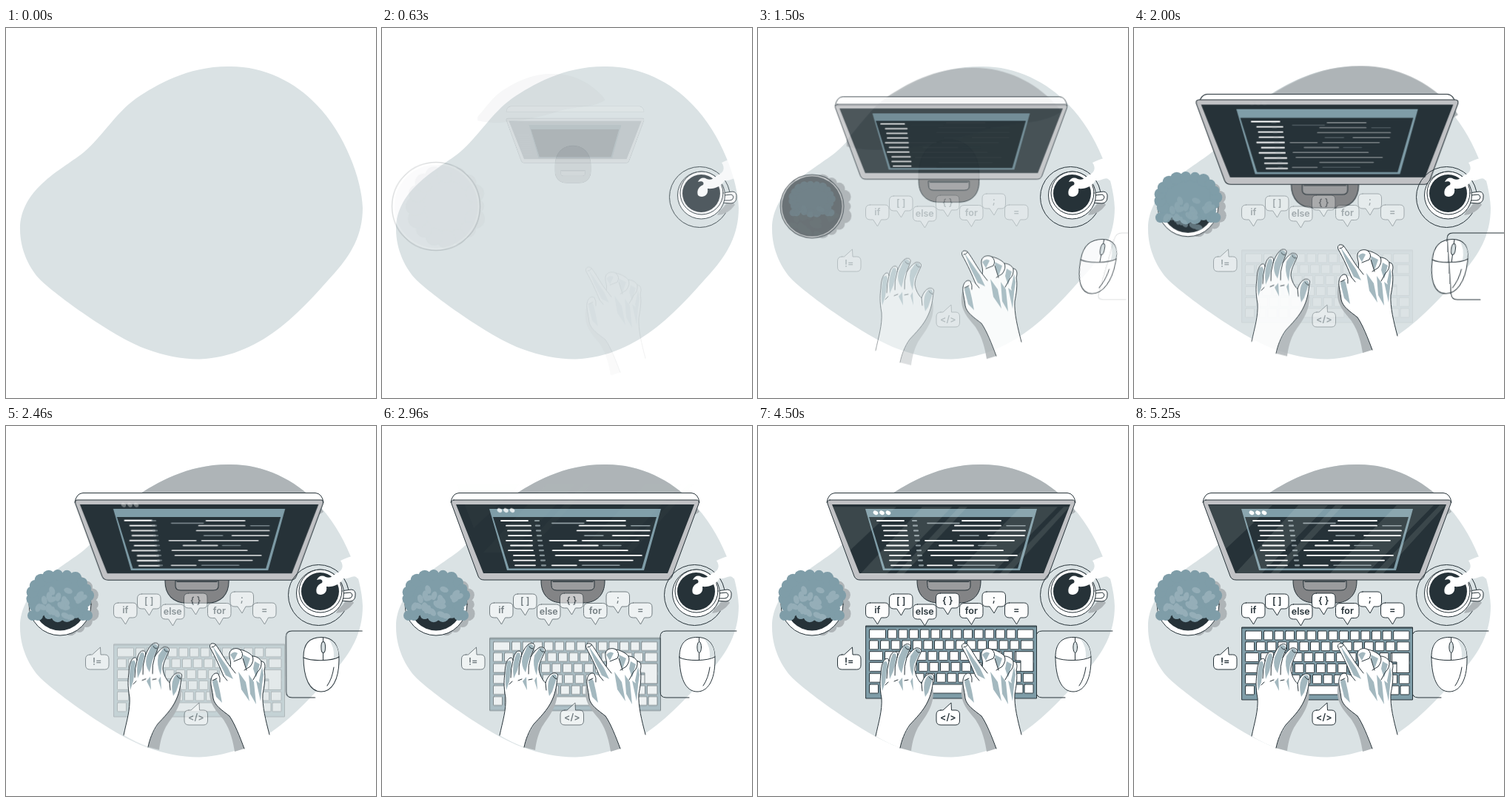
An HTML page for the animation above (5.54 s loop, 500 px wide and 500 px high).

```html
<!DOCTYPE html>
<html lang="en">
<head>
<meta charset="utf-8">
<title>Desk</title>
<style>
  html, body { margin: 0; width: 100%; height: 100%; overflow: hidden; background: #fff; }
  svg { display: block; width: 100vw; height: 100vh; }
  .o { stroke: #263238; stroke-width: 1; stroke-linejoin: round; stroke-linecap: round; }
  .w { fill: #fff; }
  .n { fill: none; }
  .d { fill: #263238; }
  .b { fill: #7f9da8; }
  .s { fill: #aeb4b7; }
  .t { fill: #a3b8bf; }
  text { font: 600 12.5px Inter, "Open Sans", sans-serif; fill: #263238; text-anchor: middle; }
</style>
</head>
<body>
<svg viewBox="0 0 500 500">
  <path fill="#dae2e4" d="M300 52C245 52 203 77 176 95C148 115 130 147 105 168C80 189 19 216 19 272C19 300 32 326 47 341C75 367 150 420 190 434C214 443 240 448 262 447.5C350 444 405 374 445 330C466 306 482 280 482 243C481 205 458 143 420 104C390 72 347 51 300 52Z"/>

  <path id="shade" class="s" d="M118 157C137 136 153 111 176 95C203 77 245 52 300 52C347 51 390 72 420 104Q426 110 429 116C400 136 360 130 320 142C255 163 170 180 118 166Z"/>

  <g id="stand" class="o">
    <path fill="#838486" d="M215 200C215 165 235 150 258 150C281 150 301 165 301 200V210C301 228 290 239 272 239H244C226 239 215 228 215 210Z"/>
    <path fill="#9b9c9e" d="M229 209H287V216Q287 222 280 222H236Q229 222 229 216Z"/>
    <path d="M231 210.500H285"/>
  </g>
  <path id="bar" class="o w" d="M93 103Q95 91 104 90.500H418Q427 91 429 103Z"/>
  <g id="frame">
    <path class="o" fill="#c1c2c5" d="M97 100H425Q429 100 428 105L392 203Q390 208 385 208H138Q132 208 130 203L94 105Q93 100 97 100Z"/>
    <path class="d" d="M100 106H422L386 199H137Z"/>
  </g>
  <g id="win">
    <path class="b" d="M145 112H377L354 195H169Z"/>
    <path class="d" d="M150 123H371L351 192.500H171.500Z"/>
  </g>
  <g id="codeA"></g>
  <g id="codeB"></g>
  <g id="codeC"></g>
  <g id="dots" class="w"></g>
  <g id="glare" fill="#e6f0e6" fill-opacity=".11">
    <path d="M101 107H187L124 166ZM222 107H262L173 199H137ZM272 107H283L196 199H185ZM355 107H405L315 199H265ZM413 107H421L337 199H325Z"/>
  </g>

  <g id="plantShade" class="s"></g>
  <circle id="pot" class="o w" cx="73" cy="241" r="42"/>
  <circle id="soil" class="d" cx="73" cy="241" r="35.500"/>
  <g id="leaves" class="b"></g>
  <g id="spots" fill="#95aeb8"></g>

  <g id="coffee">
    <circle class="o n" cx="422.500" cy="228.500" r="41"/>
    <path class="s" d="M449 247Q462 238 460 224L470 239Q461 252 446 253Z"/>
    <path class="o w" d="M452 223L467 221Q473 222 472 229Q472 236 465 237L451 236Z"/>
    <path class="o w" d="M456 226L465 225Q468 226 468 229Q467 233 463 233L455 233Z"/>
    <circle class="o w" cx="424.500" cy="226" r="32"/>
    <circle class="o w" cx="425" cy="223" r="29"/>
    <circle class="d" cx="424.500" cy="223.500" r="25.500"/>
    <path class="w" d="M420 226C424 230 435 228 433 217C442 218 452 214 456 206C464 208 470 199 475 206L484 208V172C472 174 460 178 452 182C457 189 455 196 446 199C441 204 437 206 432 204C427 201 422 203 420 208C425 206 429 208 427 212C421 214 418 220 420 226Z"/>
  </g>

  <g id="mouse" class="o">
    <path class="w" d="M402 312C402 293 411 285.500 426 285.500C441 285.500 450 294 450 316C450 344 440 359 426 359C410 359 402 340 402 312Z"/>
    <path fill="#dae2e4" stroke="none" d="M436 288Q449.500 294 449.500 311L443 314Q444 298 436 288Z"/>
    <path class="n" d="M402 313C412 318 440 318 450 312M428.500 286V316M443 326Q441 341 434 351"/>
    <ellipse fill="#dae2e4" cx="428.700" cy="299" rx="2.800" ry="7.500"/>
  </g>
  <path id="pad" class="o n" d="M415 367H384Q376 367 376 359V285Q376 277 384 277H479"/>

  <g id="keys"></g>

  <g id="handL">
    <path class="s" d="M236 352C241 380 222 396 215 410C210 420 208 431 207 439L191 435C195 420 205 404 228 372Z"/>
    <path class="w" d="M159 419C163 400 168 385 167 368C164 352 165 343 166 335C166 327 168 318 172 315C175 313 177 315 177 318C178 311 181 305 185 305C189 305 189 309 188 313C190 306 194 299 198 296C202 293 207 295 206 299L201 313C204 308 208 303 213 300C218 299 222 302 220 306C216 315 212 322 212 330C213 337 217 345 221 348C223 342 226 337 231 335C236 334 239 337 237 341C236 350 235 360 230 371C224 385 212 396 205 404C198 414 194 425 192 435Q174 428 159 419Z"/>
    <path class="t" d="M197 297Q204 294 205 300L198 318L194 334Q187 325 190 313ZM213 301Q220 300 219 306L211 322L209 338Q203 324 206 311ZM182 308Q187 305 187 313L183 331L178 342Q175 322 182 308ZM169 320Q174 315 175 322L172 346L168 358Q165 341 169 320ZM230 337Q237 335 236 342L230 360L226 366Q221 347 230 337ZM190 346L195 340L196 358ZM206 345L209 340L210 358Z"/>
    <path class="o n" d="M159 419C163 400 168 385 167 368C164 352 165 343 166 335C166 327 168 318 172 315C175 313 177 315 177 318C178 311 181 305 185 305C189 305 189 309 188 313C190 306 194 299 198 296C202 293 207 295 206 299L201 313C204 308 208 303 213 300C218 299 222 302 220 306C216 315 212 322 212 330C213 337 217 345 221 348C223 342 226 337 231 335C236 334 239 337 237 341C236 350 235 360 230 371C224 385 212 396 205 404C198 414 194 425 192 435M188 313Q184 325 185 337M201 313Q197 325 198 336M177 318Q174 328 174 341M221 348L222 358M199 299Q201 303 204 302M214 303Q215 307 219 306M172 350L176 346M184 345L189 343M198 344L203 343M231 339Q234 343 236 343"/>
  </g>
  <g id="handR">
    <path class="s" d="M277 345C269 373 285 385 294 397C304 412 307 428 309 440L322 436L302 388Z"/>
    <path class="w" d="M322 436C316 420 309 402 302 392C292 384 282 378 280 368C279 357 276 350 277 343C278 336 283 332 287 335L294 338C290 328 283 312 276 300C274 295 278 292 283 295C290 304 297 318 303 325C305 318 301 313 302 307C303 301 311 299 316 302C322 303 330 307 333 311C338 311 343 314 345 318C350 318 351 324 349 330C351 340 349 352 347 362C346 378 351 398 356 417Q340 430 322 436Z"/>
    <path class="t" d="M279 297L300 327L307 342L297 337L287 317ZM303 309Q308 303 313 307L308 317ZM320 309L330 314L325 328L321 318ZM336 318L343 322L338 340L334 328ZM346 325L348 336L345 356L342 344ZM314 332L324 346L329 372L318 356ZM328 336L335 346L338 376L330 362ZM338 344L346 350L344 372ZM279 346Q283 338 286 345L289 358L292 374L284 366Z"/>
    <path class="o n" d="M322 436C316 420 309 402 302 392C292 384 282 378 280 368C279 357 276 350 277 343C278 336 283 332 287 335Q290 340 289 346M294 338C290 328 283 312 276 300C274 295 278 292 283 295C290 304 297 318 303 325C305 318 301 313 302 307C303 301 311 299 316 302C322 303 330 307 333 311C338 311 343 314 345 318C350 318 351 324 349 330C351 340 349 352 347 362C346 378 351 398 356 417M294 338L299 344M303 325L310 334M316 302Q322 307 318 314L308 318M333 311Q336 317 330 325L322 330M320 314L325 330M345 318Q346 327 340 332L334 343M278 299Q281 299 283 296M279 344L285 341"/>
  </g>
  <g id="tags"></g>
</svg>
<script>
const LOOP = 5540;
const BACK = 'cubic-bezier(.36,-.01,.5,1.38)';
const $ = id => document.getElementById(id);

function add(parent, tag, attrs, text) {
  const el = document.createElementNS('http://www.w3.org/2000/svg', tag);
  for (const k in attrs) el.setAttribute(k, attrs[k]);
  if (text) el.textContent = text;
  parent.append(el);
  return el;
}

let seed = 7;
const rnd = () => (seed = seed * 16807 % 2147483647) / 2147483647;

// Code on the screen
const line = (g, x1, x2, row, color = '#fff', width = 1.8) =>
  add($(g), 'path', { d: `M${x1} ${128 + row * 6.7}H${x2}`, stroke: color, 'stroke-width': width, 'stroke-linecap': 'round' });

[[161, 197], [168, 201], [170, 201], [171, 202], [168, 203],
 [174, 203], [171, 204], [178, 206], [178, 207], [180, 207]]
  .forEach(([a, b], i) => {
    line('codeA', a, b, i);
    line('codeB', 209 + i, 214 + i, i, '#8f9ca1', 2.2);
  });
[[[276, 328]], [[266, 328]], [[263, 361]], [[311, 360]], [[226, 262], [270, 346]],
 [[245, 291]], [[230, 331]], [[234, 350]], [[266, 338]], [[229, 262]]]
  .forEach((row, i) => row.forEach(([a, b]) => line('codeC', a, b, i)));
[[229, 272, .5], [336, 361, 1], [273, 298, 3], [298, 322, 5], [270, 320, 9]]
  .forEach(([a, b, i]) => line('codeC', a, b, i, '#8f9ca1', 1.6));
for (const x of [159, 167.5, 176])
  add($('dots'), 'ellipse', { cx: x, cy: 117.3, rx: 3.5, ry: 2.6, transform: `rotate(25 ${x} 117.3)` });

// Plant
function clump(g, cx, cy, rx, ry, n, r) {
  add(g, 'ellipse', { cx, cy, rx, ry });
  for (let i = 0; i < n; i++) {
    const a = i / n * 2 * Math.PI;
    add(g, 'circle', { cx: cx + rx * Math.cos(a), cy: cy + ry * Math.sin(a), r: r * (.8 + .4 * rnd()) });
  }
}
clump($('plantShade'), 87, 241, 31, 33, 16, 8.5);
clump($('leaves'), 73, 229, 38, 28, 19, 7.5);
for (const x of [36, 43, 104, 110]) add($('leaves'), 'circle', { cx: x, cy: 256, r: 7 });
for (let i = 0; i < 24; i++) {
  const a = rnd() * 6.28, q = Math.sqrt(rnd());
  const x = 75 + 35 * q * Math.cos(a), y = 240 + 20 * q * Math.sin(a);
  add($('spots'), 'ellipse', { cx: x, cy: y, rx: 6, ry: 3.8, transform: `rotate(${rnd() * 180} ${x} ${y})` });
}

// Keyboard
const key = (x, y, w, h = 12) =>
  add($('keys'), 'rect', { class: 'o w', x, y, width: w, height: h, rx: .8 });
add($('keys'), 'rect', { class: 'o b', x: 146, y: 272, width: 230.5, height: 98 });
add($('keys'), 'path', { class: 'o n', d: 'M146 273H376' });
[22, 12, 18, 20, 15].forEach((first, r) => {
  const y = 277 + r * 14.8;
  key(150.5, y, first);
  let x = 153.5 + first;
  for (; x < 345; x += 14.6) key(x, y, 11.8);
  key(x, y, 372 - x);
});
for (const x of [150.5, 166, 181, 196, 211]) key(x, 351, 12);
key(226, 351, 58);
for (const x of [287, 302, 317, 332, 346, 360]) key(x, 351, 12);
add($('keys'), 'path', { class: 'o w', d: 'M349 306.6H372V333.500H355V319H349Z' });

// Word bubbles: label, left, top, fade start, fade end, tail points up
const tags = [
  ['if', 145.5, 239], ['[ ]', 177.5, 227], ['else', 209.5, 241], ['{ }', 240.5, 226],
  ['for', 272.5, 239.5], [';', 303, 224], ['=', 333.5, 239],
  ['!=', 107.5, 309, 750, 4500, true], ['</>', 241, 384, 750, 4500, true]
].map(([label, x, y, t0 = 750, t1 = 4650, up]) => {
  const g = add($('tags'), 'g', {});
  const tail = up ? 'H9L20 -10L20.500 0' : 'H26';
  const foot = up ? '' : 'H21L16 29L10 20';
  add(g, 'path', {
    class: 'o w', transform: `translate(${x} ${y})`,
    d: `M6 0${tail}H26Q31.500 0 31.500 6V14Q31.500 20 26 20${foot}H6Q0 20 0 14V6Q0 0 6 0Z`
  });
  add(g, 'text', { x: x + 15.8, y: y + 14.4 }, label);
  return { g, t0, t1 };
});

// steps: [time, opacity, transform, easing to the next step]
function play(el, steps, origin = [250, 250]) {
  el.style.transformOrigin = origin.map(v => v + 'px').join(' ');
  const frames = steps.map(([t, opacity, transform = 'none', easing = 'linear']) =>
    ({ offset: t / LOOP, opacity, transform, easing }));
  const last = frames[frames.length - 1];
  el.animate([{ ...frames[0], offset: 0, easing: 'linear' }, ...frames, { ...last, offset: 1 }],
    { duration: LOOP, iterations: Infinity });
}
const enter = (id, t0, dur, from, origin) =>
  play($(id), [[t0, 0, from, BACK], [t0 + dur, 1, from.replace(/\(.*\)/, /scale/.test(from) ? '(1)' : '(0px, 0px)')]], origin);
const pop = (id, small, origin) => play($(id), [
  [250, 0, 'scale(.5)', 'ease-in'],
  [1040, .46, `scale(${small})`, 'cubic-bezier(.3,.25,.5,1)'],
  [2000, 1, 'scale(1.058)', 'ease-in-out'],
  [2520, 1, 'scale(1)']], origin);

enter('shade', 250, 2200, 'scale(.5)', [143, 74]);
enter('bar', 250, 2200, 'scale(.5)', [261, 125]);
pop('stand', .72, [258, 171]);
pop('frame', .69, [261, 150]);
pop('win', .63, [261, 153]);
play($('codeA'), [
  [500, 0, 'translate(9px, 0px) scale(.4)', 'ease-in'],
  [1040, .5, 'translate(9px, 0px) scale(.55, .74)', 'ease-out'],
  [2000, 1, 'translate(-1px, 0px) scale(1.05)', 'ease-in-out'],
  [2700, 1, 'translate(0px, 0px) scale(1)']], [184, 157]);
enter('codeB', 1300, 2700, 'translate(-30px, 0px)');
enter('codeC', 1300, 2300, 'translate(-22px, 0px)');
enter('dots', 1750, 2300, 'translate(0px, -16px)');
enter('glare', 2350, 2480, 'translate(0px, -36px)');

enter('plantShade', 300, 1900, 'scale(1.4)', [88, 242]);
enter('pot', 210, 1980, 'scale(1.5)', [73, 241]);
play($('soil'), [
  [500, 0, 'scale(1.6)', 'ease-in'],
  [1040, .2, 'scale(1.4)', 'ease-out'],
  [2100, 1, 'scale(1)']], [73, 241]);
enter('leaves', 1040, 1400, 'scale(.5)', [73, 235]);
play($('spots'), [
  [1300, 0, 'translate(0px, 24px)', BACK],
  [3080, 1, 'translate(0px, 0px)']]);

enter('coffee', 210, 820, 'translate(30px, 0px)');
play($('mouse'), [
  [850, 0, 'translate(112px, 0px) skewX(-20deg)', 'ease-in'],
  [1040, .5, 'translate(96px, 0px) skewX(-18deg)', 'ease-out'],
  [2000, 1, 'translate(0px, 0px) skewX(-7deg)', 'ease-in-out'],
  [2500, 1, 'translate(0px, 0px) skewX(0deg)']], [426, 322]);
play($('pad'), [
  [1400, 0, 'translate(104px, 0px) skewX(-20deg)'],
  [2000, 1, 'translate(50px, 0px) skewX(4deg)', 'ease-out'],
  [2560, 1, 'translate(0px, 0px) skewX(0deg)']], [376, 322]);

enter('keys', 1500, 3740, 'translate(0px, 30px)');
enter('handL', 620, 2470, 'translate(0px, 30px)');
play($('handR'), [
  [450, 0, 'translate(0px, 30px)', 'ease-in'],
  [1040, .5, 'translate(0px, 25px)', 'cubic-bezier(.35,.25,.5,1)'],
  [1950, 1, 'translate(0px, -1px)', 'ease-in-out'],
  [2450, 1, 'translate(0px, 0px)']]);
for (const { g, t0, t1 } of tags) play(g, [[t0, 0], [t1, 1]]);
</script>
</body>
</html>
```
